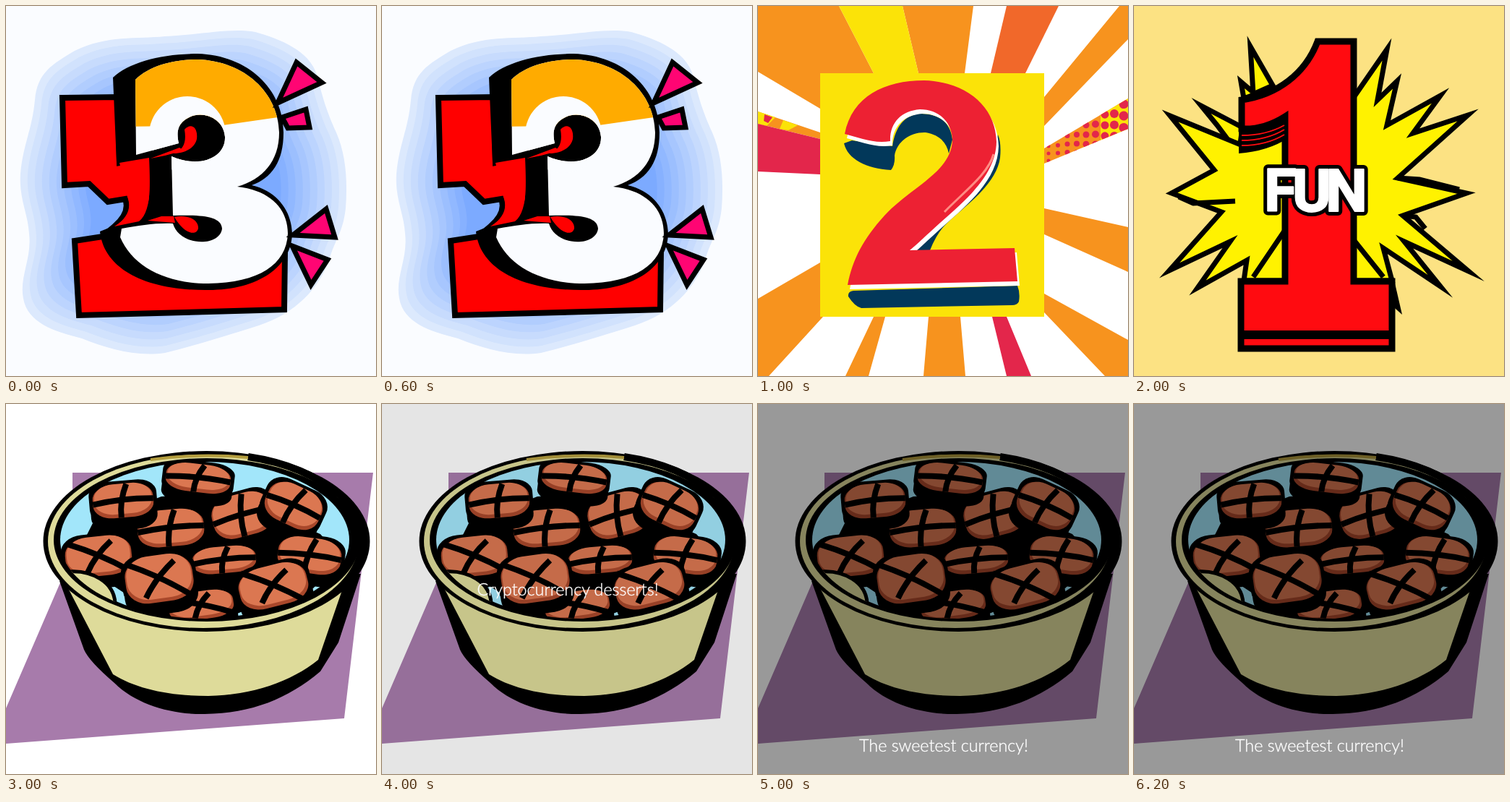
Recreate the animation shown at these times as an HTML page. Size 512x512 px, loop 7 s.

```html
<!DOCTYPE html>
<html lang="en">
<head>
<meta charset="utf-8">
<title>Countdown</title>
<style>
  html, body { margin: 0; width: 100%; height: 100%; overflow: hidden; background: #fff; }
  svg { display: block; width: 100vw; height: 100vh; }
  .scene { display: none; }
  .ink { stroke: #000; stroke-width: 8; stroke-linejoin: miter; }
  .burst { stroke-width: 7; stroke-miterlimit: 12; }
  .orange { fill: #f7931e; }
  .crimson { fill: #e3264b; }
  .caption { font: 300 23.3px Lato, sans-serif; fill: #fff; stroke: #fff; stroke-width: .4; text-anchor: middle; }
  .fun { font: 700 82px Roboto, sans-serif; stroke-linejoin: round; }
</style>
</head>
<body>
<svg viewBox="0 0 512 512">
  <defs>
    <path id="cloud" d="M20 232C24 190 36 172 40 130C43 92 65 80 95 62C140 40 180 46 220 42C270 40 310 30 345 36C380 46 420 62 430 95C438 125 442 142 457 175C470 205 473 240 470 280C466 315 456 320 446 355C432 390 402 425 350 442C300 458 260 470 220 480C180 486 140 474 105 460C65 450 30 438 24 405C18 375 36 350 32 315C30 285 18 268 20 232Z"/>
    <path id="three" d="M179 102C200 81 235 74 265 74C330 76 377 120 378 175C378 215 355 240 320 250C365 255 390 280 390 315C388 358 350 383 280 384C220 384 175 360 158 320L160 308C185 304 206 300 231 301C240 333 296 334 299 308C298 290 268 289 231 290L229 208C268 225 304 210 303 181C301 153 267 142 247 158C237 166 236 176 239 190L180 206Z"/>
    <clipPath id="threeClip"><use href="#three"/></clipPath>
    <path id="two" d="M120 177C130 125 175 103 230 103C290 105 329 140 330 188C329 232 292 265 252 300C232 318 220 330 210 338L355 335L359 381L124 386C131 350 146 322 175 290C212 250 268 230 269 185C268 160 250 143 224 143C198 145 182 162 183 187C160 191 140 182 120 177Z"/>
    <clipPath id="bowlClip"><ellipse cx="276" cy="188" rx="202" ry="109"/></clipPath>
    <clipPath id="dottedRay"><path d="M512 128V170L396 218V197Z"/></clipPath>
  </defs>

  <g class="scene">
    <path fill="#fafcff" d="M0 0H512V512H0Z"/>
    <g id="glow"></g>
    <g class="ink" fill="#f00">
      <path d="M95 325L140 318L386 340L385 420L101 428Z"/>
      <path d="M78 127L155 126L157 217L200 210C204 255 204 290 190 300L150 305C164 293 170 280 165 267L141 271L115 246L81 248Z"/>
    </g>
    <path d="M148 99C170 78 215 66 265 66C335 68 384 115 384 175C384 215 368 238 340 248C374 256 395 282 396 315C395 360 350 393 280 393C190 394 135 362 130 312L150 304C185 302 195 285 199 262L200 210L153 216Z"/>
    <path fill="#f00" d="M157 217L198 210C200 255 200 285 184 298L150 305C168 294 174 280 168 264Z"/>
    <use href="#three" fill="#fafcff"/>
    <g clip-path="url(#threeClip)">
      <path fill="#ffab00" d="M170 60H390V152L300 165L170 167Z"/>
      <circle cx="251" cy="178" r="53" fill="#fafcff"/>
    </g>
    <path fill="#f00" d="M247 171C256 161 266 168 264 184C261 198 245 204 232 204C246 199 250 188 247 171ZM233 292C250 288 267 295 266 308C263 319 246 315 233 292ZM196 297L215 291L232 291L234 300ZM200 211L240 196L246 200L220 207Z"/>
    <path class="ink" style="stroke-width:7" fill="#ff0573" d="M402 78L437 106L376 134ZM382 154L415 143L420 168L390 169ZM397 317L443 281L455 320ZM396 332L445 351L422 386Z"/>
  </g>

  <g class="scene">
    <path fill="#fff" d="M0 0H512V512H0Z"/>
    <path class="orange" d="M0 0H112L160 93H86V142L0 91ZM200 0H298L286 93H222ZM500 0H512V46L396 166V126ZM396 280L512 306V368L396 316ZM396 398L512 462V512H480L396 424ZM236 430H280L287 512H229ZM160 430H176L153 512H121ZM86 355V430H90L15 512H0V405ZM0 146L86 175V184L0 163Z"/>
    <path fill="#fbe308" d="M112 0H200L222 93H160ZM0 146L24 154L12 166L0 163ZM35 158L55 165L42 172L30 170Z"/>
    <path fill="#f1682a" d="M344 0H416L370 93H322Z"/>
    <path class="crimson" d="M0 163L86 184V233L0 229ZM324 430H344L378 512H344ZM9 150l11 4-6 8-6-3Z"/>
    <g clip-path="url(#dottedRay)">
      <path class="orange" d="M390 120H512V220H390Z"/>
      <path fill="#fbe308" d="M474 140L512 125V172L474 187Z"/>
      <g id="dots" class="crimson"></g>
    </g>
    <path fill="#fbe308" d="M86 93H396V430H86Z"/>
    <path fill="#02385a" d="M119 190C124 212 150 225 184 227Q190 220 189 207C192 187 212 174 232 175C250 178 261 188 264 204L269 185C266 160 250 149 224 149C202 151 190 168 186 194L130 186ZM332 178Q337 190 335 210C330 246 290 274 262 300Q248 313 238 338H210L252 294L320 232ZM132 394L359 387Q363 397 361 409Q359 414 351 414L143 418Q134 416 125 402Q124 395 132 394Z"/>
    <use href="#two" x="3" y="6" fill="#fff"/>
    <use href="#two" fill="#ed2133"/>
    <path d="M326 205C319 232 285 257 258 285" fill="none" stroke="#ff8c84" stroke-width="3"/>
  </g>

  <g class="scene">
    <path fill="#fce283" d="M0 0H512V512H0Z"/>
    <path d="M371 427L359 375L354 412Z"/>
    <g class="ink burst" fill="#fff200">
      <path d="M161 56L192 110L165 122ZM148 105L168 122L152 128ZM93 138L150 168L145 205L115 165Z"/>
      <path d="M305 125L350 60L337 130L364 104L350 165L424 124L386 176L462 151L365 238L460 259L372 290L463 367L374 326L424 388L345 335L357 380H152L156 352L88 390L133 326L49 366L121 285L52 259L111 227L50 152L150 193V130Z"/>
      <path fill="none" d="M365 238L395 240L450 254M372 290L390 292L403 308M62 264L82 273L140 270M209 310L165 375M305 325L345 375"/>
    </g>
    <path class="ink" style="stroke-width:9" fill="#ff0b10" d="M254 49H304V381H357V474H148V381H209V153C190 165 169 171 149 170V130C198 123 237 94 254 49Z"/>
    <path d="M145 171Q183 171 213 153V183Q185 201 145 204Z"/>
    <path fill="none" stroke="#ff0b10" stroke-width="2" d="M149 179Q183 179 208 165M149 186Q183 186 208 171M149 193Q183 193 208 178"/>
    <path d="M148 455H357" stroke="#000" stroke-width="12"/>
    <text class="fun" x="180 219 265" y="284" stroke="#000" stroke-width="12">FUN</text>
    <text class="fun" x="180 219 265" y="284" fill="#fff" stroke="#fff" stroke-width="2">FUN</text>
  </g>

  <g class="scene">
    <path fill="#fff" d="M0 0H512V512H0Z"/>
    <path fill="#a77bab" d="M92 95H508L468 435L0 470V421L92 208Z"/>
    <path d="M74 245L108 340Q115 356 150 386C180 416 230 430 275 429C340 428 390 408 435 370L460 330L491 235Z"/>
    <path fill="#dedb9a" d="M86 255L148 374C180 394 225 404 280 404C340 403 395 384 432 354L466 255Z"/>
    <ellipse cx="277.500" cy="190" rx="226" ry="125"/>
    <ellipse cx="273" cy="190" rx="215" ry="120" fill="#dedb9a"/>
    <ellipse cx="278" cy="188" rx="212" ry="113"/>
    <path fill="none" stroke="#000" stroke-width="10" d="M335 73Q415 85 460 126"/>
    <path fill="none" stroke="#b39d3e" stroke-width="4" d="M200 77Q265 68 335 74"/>
    <ellipse cx="275" cy="188" rx="200" ry="108" fill="#a2e6fa"/>
    <g clip-path="url(#bowlClip)">
      <path d="M120 165L215 128L330 122L365 150L435 180L466 215L425 255L345 280L300 298L210 292L140 246L90 225Z"/>
      <g id="candies"></g>
      <path class="ink" style="stroke-width:5" fill="#dedb9a" d="M88 232C118 230 150 246 151 276C125 270 98 255 88 232Z"/>
    </g>
  </g>
  <path id="shade" d="M0 0H512V512H0Z"/>
  <text id="caption" class="caption" x="257"></text>
</svg>
<script>
const $ = id => document.getElementById(id);
const scenes = [...document.querySelectorAll(".scene")];

const bands = 10;
$("glow").innerHTML = Array.from({ length: bands }, (_, i) => {
  const k = i / (bands - 1), mix = (a, b) => Math.round(a + (b - a) * k);
  return `<use href="#cloud" fill="rgb(${mix(220, 124)},${mix(233, 170)},${mix(253, 255)})"
    transform="translate(245 255) scale(${1 - 0.4 * k}) translate(-245 -255)"/>`;
}).join("");

// Staggered spots grow toward the outer end of the ray.
$("dots").innerHTML = Array.from({ length: 27 }, (_, i) => {
  const column = Math.floor(i / 3), x = 402 + column * 13;
  const y = 207 - (x - 396) * 0.5 + (i % 3 - 1) * (10 + column * 0.8) + (column % 2) * 6;
  return `<circle cx="${x}" cy="${y}" r="${2.5 + column * 0.5}"/>`;
}).join("");

// The scored cross may be turned against the body.
function candy([x, y, rx, ry, angle, turn = 0]) {
  const box = (dy, fill, grow = 0) => `<rect x="${-rx - grow}" y="${-ry - grow + dy}"
    width="${2 * (rx + grow)}" height="${2 * (ry + grow)}" rx="${rx * 0.65}" ry="${ry * 0.8}" fill="${fill}"/>`;
  return `<g transform="translate(${x} ${y}) rotate(${angle})">
    ${box(13, "#000", 4)}${box(0, "#000", 5)}${box(0, "#a9482b")}${box(-3, "#db7751", -2)}
    <path d="M${-rx} 2Q0 -4 ${rx} 0M${rx * 0.15} ${-ry}Q-5 0 ${-rx * 0.1} ${ry}"
      transform="rotate(${turn})" fill="none" stroke="#000" stroke-width="8"/></g>`;
}
$("candies").innerHTML = [
  [327, 154, 42, 29, -15], [228, 172, 46, 25, -5], [266, 103, 45, 19, 7],
  [162, 134, 42, 23, -5], [398, 141, 40, 27, 25], [420, 210, 44, 24, 8],
  [302, 216, 44, 18, -5], [128, 211, 46, 27, -6, 30], [270, 279, 45, 19, -8, 20],
  [370, 252, 48, 28, -14, 38], [212, 242, 47, 32, -8, 34]
].map(candy).join("");

const captions = {
  4: { text: "Cryptocurrency desserts!", y: 265, shade: 0.1 },
  5: { text: "The sweetest currency!", y: 481, shade: 0.4 }
};
let shown = -1;

function render() {
  const step = Math.min(5, Math.floor(performance.now() % 7000 / 1000));
  if (step !== shown) {
    shown = step;
    scenes.forEach((scene, i) => scene.style.display = i === Math.min(step, 3) ? "inline" : "none");
    const { text, y, shade } = captions[step] || { text: "", y: 0, shade: 0 };
    $("shade").setAttribute("opacity", shade);
    $("caption").textContent = text;
    $("caption").setAttribute("y", y);
  }
  requestAnimationFrame(render);
}
render();
</script>
</body>
</html>
```
